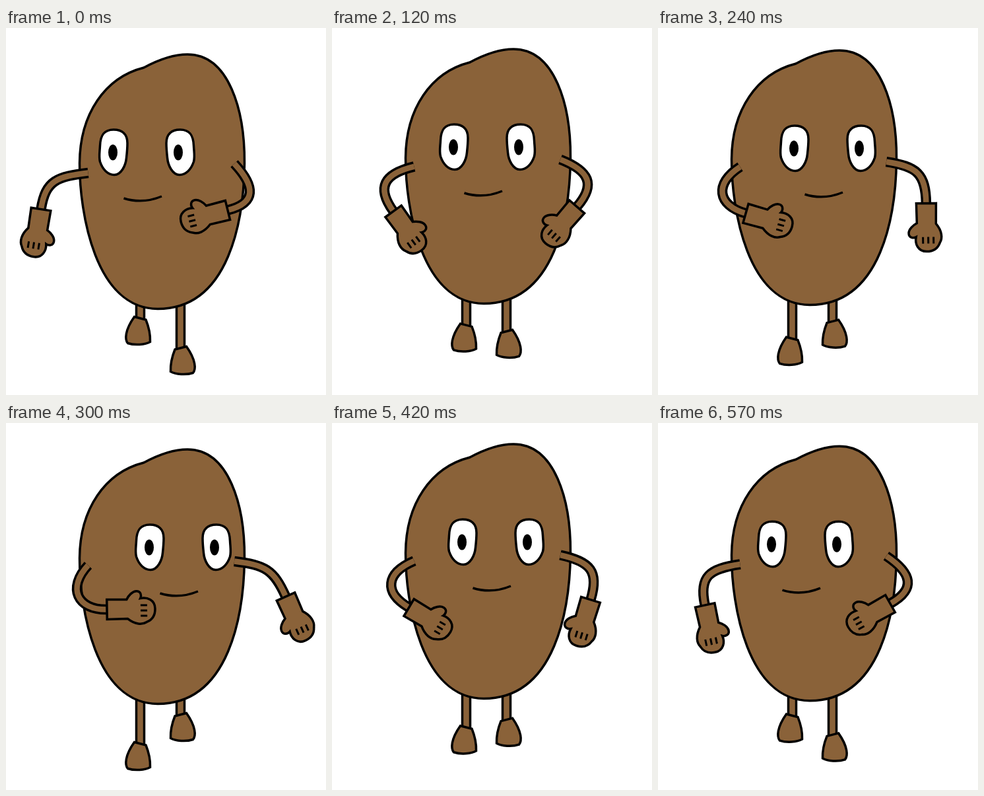
Write an HTML page with a canvas that moves like this. It is 485 by 556 pixels and loops after 600 ms.

```html
<!DOCTYPE html>
<html lang="en">
<head>
<meta charset="utf-8">
<title>Walking potato</title>
<style>
html, body { margin: 0; width: 100%; height: 100%; overflow: hidden; background: #fff; }
canvas { display: block; }
</style>
</head>
<body>
<canvas id="c" width="485" height="556"></canvas>
<script>
const ctx = document.getElementById('c').getContext('2d');
const STEP = 30, STEPS = 20;
const FORTH = 10, BACK = 11, PASS = 6; // steps per swing, legs pass each other at PASS
const SKIN = '#8a6239', INK = '#000', LINE = 3.5;

const body = new Path2D('M209 60C235 46 255 40 275 40C338 40 362 125 361.5 205' +
  'C360.5 287 340 425.5 230 425.5C135 425.5 111.5 280 111.5 205C112 130 150 75 209 60Z');
const mouth = new Path2D('M178.5 258Q207 267 236 255');
// eye around its middle
const eye = new Path2D('M.5 -34.5C-14 -34.5 -19.5 -26 -20 -10C-20.5 0 -22 6 -20 14' +
  'C-16 26 -8 34 1.5 34C12 34 19 20 20 8C21 -1 21.5 -8 21.5 -14C21.5 -28 13.5 -34.5 .5 -34.5Z');
// shoe with its sole at y = 0, hand with its cuff at the origin and thumb to +x
const shoe = new Path2D('M-9 -42.5L8.5 -38C12.5 -28 15.5 -17 15 -4.5C7.5 0 -8.5 1 -19 -2.5C-23.5 -8 -23.5 -22 -9 -42.5Z');
const hand = new Path2D('M-15 0L15 0L14.5 30C20.5 33 27 39 27 45C27 52 20 53 16 51' +
  'C18 61 13.5 73 0 73C-11 73 -17 68 -20 60C-24.5 53 -23.5 42 -14.5 31Z');

const leftArm = { side: 1, shoulder: [124.5, 217.5], wrist: [103, 278.5], reach: 50, drop: 4, tilt: -46 };
const rightArm = { side: -1, shoulder: [346, 207.5], wrist: [380, 269.5], reach: 44, drop: 6.5, tilt: -31 };

const rad = deg => deg * Math.PI / 180;

// swing runs from -1 to 1 and back; rise is the lift of the body as the legs pass
function poseAt(n) {
  const forth = n < FORTH;
  const span = forth ? FORTH : BACK;
  const k = forth ? n : n - FORTH;
  const swing = (forth ? 1 : -1) * (2 * k / span - 1);
  const lift = k < PASS ? k / PASS : (span - k) / (span - PASS);
  return { swing, rise: -12 * lift };
}

function shape(path, fill = SKIN) {
  ctx.fillStyle = fill;
  ctx.fill(path);
  ctx.stroke(path);
}

function at(x, y, flip, draw) {
  ctx.save();
  ctx.translate(x, y);
  ctx.scale(flip, 1);
  draw();
  ctx.restore();
}

// open-ended limb: ink, then a thinner stripe of skin
function tube(path) {
  for (const [width, color] of [[15.5, INK], [8.5, SKIN]]) {
    ctx.lineWidth = width;
    ctx.strokeStyle = color;
    ctx.stroke(path);
  }
  ctx.lineWidth = LINE;
  ctx.strokeStyle = INK;
}

function drawLeg(x, sole, side) {
  const leg = new Path2D();
  leg.moveTo(x, 395);
  leg.lineTo(x, sole - 38);
  tube(leg);
  at(x, sole, side, () => shape(shoe));
}

function drawFace() {
  at(162.5, 188.5, 1, () => shape(eye, '#fff'));
  at(264.5, 188.5, -1, () => shape(eye, '#fff'));
  ctx.fillStyle = INK;
  for (const x of [162, 261]) {
    ctx.beginPath();
    ctx.ellipse(x, 188.5, 7, 12, 0, 0, Math.PI * 2);
    ctx.fill();
  }
  ctx.stroke(mouth);
}

function drawHand() {
  shape(hand);
  ctx.lineWidth = 3;
  ctx.beginPath();
  for (const x of [-10.5, -2.5, 5.5]) {
    ctx.moveTo(x, 51);
    ctx.lineTo(x, 61);
  }
  ctx.stroke();
}

// s = 1: arm folded in front of the body, s = -1: stretched out
function drawArm({ side, shoulder, wrist, reach, drop, tilt }, s, rise) {
  const upper = rad(17 + 20 * s + 10 * s * s);
  const bend = rad(tilt - 50 * s + 5 * s * s);
  const x = (wrist[0] - shoulder[0]) * side + reach * s;
  const y = wrist[1] + drop * s - shoulder[1] - rise + 2 * s;

  at(shoulder[0], shoulder[1] + rise - 2 * s, side, () => {
    const arm = new Path2D();
    arm.moveTo(0, 0);
    arm.bezierCurveTo(-47 * Math.cos(upper), 47 * Math.sin(upper),
      x + 45 * Math.sin(bend), y - 45 * Math.cos(bend), x, y);
    tube(arm);
    ctx.translate(x, y);
    ctx.rotate(bend);
    drawHand();
  });
}

function draw(n) {
  const { swing, rise } = poseAt(n);
  ctx.fillStyle = '#fff';
  ctx.fillRect(0, 0, 485, 556);
  ctx.strokeStyle = INK;
  ctx.lineWidth = LINE;

  at(0, rise, 1, () => {
    drawLeg(203.5, 503 + 23 * swing, 1);
    drawLeg(264.5, 503.5 - 21.5 * swing, -1);
    shape(body);
    ctx.translate(27.5 * (swing + 1), 0);
    drawFace();
  });

  drawArm(leftArm, swing, rise);
  drawArm(rightArm, -swing, rise);
}

const start = performance.now();
function tick(now) {
  const t = Math.max(0, now - start);
  draw(Math.floor(t / STEP + 1e-6) % STEPS);
  requestAnimationFrame(tick);
}
tick(start);
</script>
</body>
</html>
```
